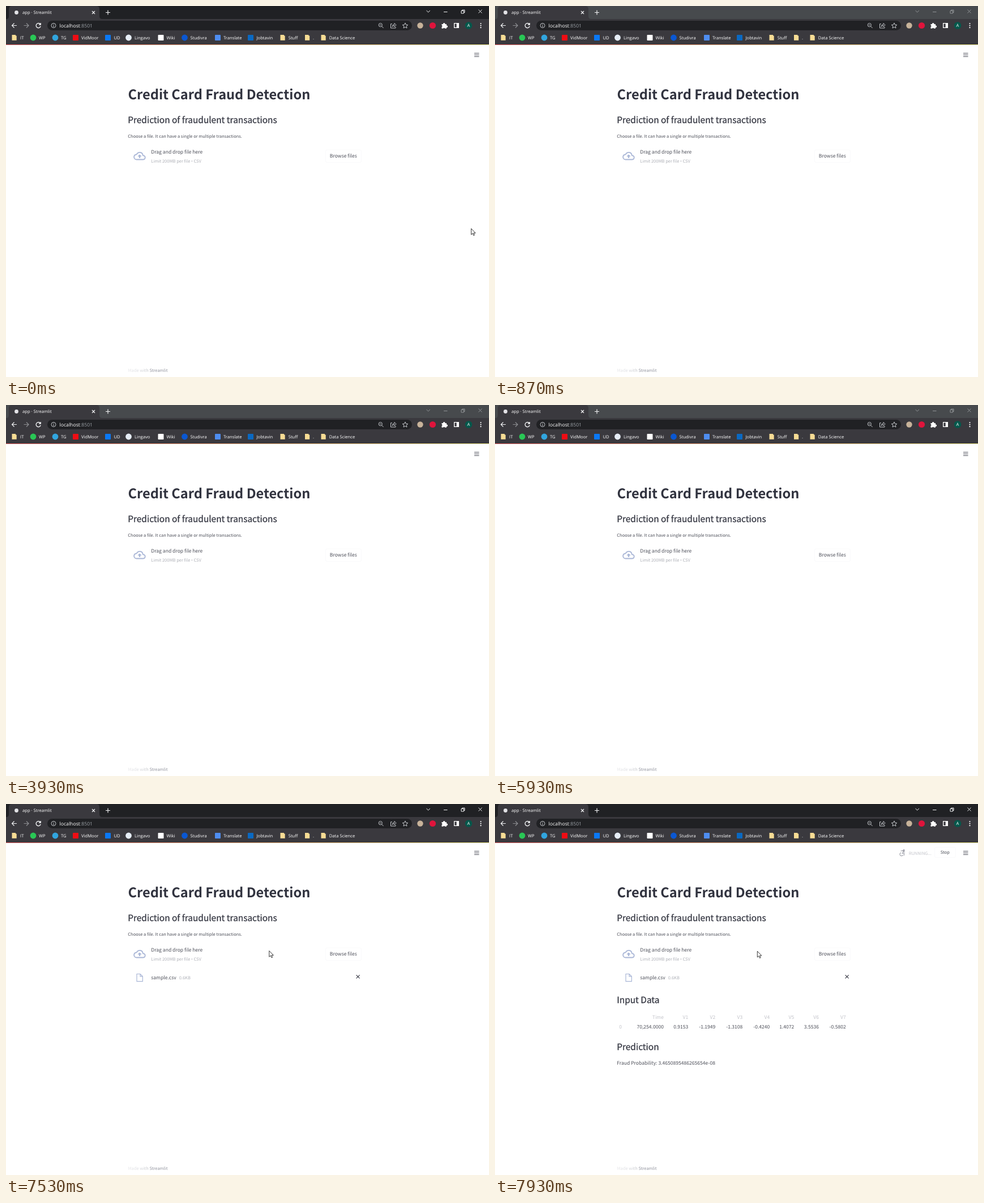
These frames come from a looping animation (853 px wide and 656 px high, 8 s). An HTML page:

```html
<!DOCTYPE html>
<html lang="en">
<head>
<meta charset="utf-8">
<title>Credit Card Fraud Detection</title>
<style>
  html, body { margin: 0; width: 100%; height: 100%; overflow: hidden; background: #fff; }
  svg { display: block; }
  text { text-rendering: geometricPrecision; white-space: pre; }
  .ui { font: 7.65px "Open Sans", "Noto Sans", sans-serif; fill: #fff; }
  .page { font: 8.57px "Noto Sans CJK JP", "Noto Sans CJK SC", "Noto Sans", sans-serif; fill: #4e505a; }
  .page .small { font-size: 7.5px; }
  .page .pale { fill: #aeb0b7; }
  .page .faint { fill: #c3c4ca; }
  .page .h1 { font-size: 23.6px; font-weight: 700; fill: #31333f; }
  .page .h3 { font-size: 15.4px; fill: #363843; stroke: #363843; stroke-width: .3px; }
  .line { fill: none; stroke: #f1f2f4; stroke-width: 1.2; }
  .button { fill: #fff; stroke: #fafafb; }
  .end { text-anchor: end; }
</style>
</head>
<body>
<svg width="853" height="656" viewBox="0 0 853 656">
  <defs>
    <linearGradient id="strip">
      <stop stop-color="#e0585a"/><stop offset="1" stop-color="#e6e27c"/>
    </linearGradient>
    <linearGradient id="fade" gradientUnits="userSpaceOnUse" x1="216" x2="254" y1="0" y2="0">
      <stop stop-color="#e8e8eb"/><stop offset=".5" stop-color="#dcdde1"/><stop offset="1" stop-color="#bfc0c6"/>
    </linearGradient>
  </defs>

  <!-- Browser window -->
  <rect id="titleBar" width="853" height="24"/>
  <path d="M1 23Q5 23 5 18V6Q5 0 10 0H160Q165 0 165 6V18Q165 23 170 23H853V68H0V23Z" fill="#3a393e"/>
  <rect x="73" y="26" width="644" height="17" rx="8.5" fill="#202124"/>
  <rect y="68" width="853" height="1" fill="url(#strip)"/>

  <g class="ui">
    <circle cx="18.5" cy="11.5" r="3.4" fill="#e2e2e6"/>
    <text x="29" y="14">app · Streamlit</text>
    <text x="94.5" y="37.7" font-size="8.7">localhost<tspan fill="#9aa0a6">:8501</tspan></text>
    <g id="bookmarks"></g>
    <circle cx="731.5" cy="34.5" r="5.2" fill="#c8b39a"/>
    <circle cx="753.5" cy="34.5" r="5.6" fill="#e0143c"/>
    <circle cx="817" cy="34.5" r="6.3" fill="#05574b"/>
    <text x="814.4" y="37.2">A</text>
    <path d="M769.5 32h2.6a1.7 1.7 0 1 1 3.3 0h2.6v2.6a1.7 1.7 0 1 1 0 3.3v1.8h-3a1.5 1.5 0 0 0-2.8 0h-2.7v-2.8a1.5 1.5 0 0 0 0-2.8Z"/>
    <path d="M791 30h9v9h-9ZM792.3 31.3v6.4h3.4v-6.4Z" fill-rule="evenodd"/>
    <circle cx="838.5" cy="31" r="1.1"/><circle cx="838.5" cy="34.6" r="1.1"/><circle cx="838.5" cy="38.2" r="1.1"/>
  </g>
  <g class="line">
    <path d="M152 9l5 5M157 9l-5 5M180 7.5v8M176 11.5h8"/>
    <path d="M19 34.5h-8.5M14.5 30.5l-4 4l4 4"/>
    <path d="M31.5 34.5h8.5M36 30.5l4 4l-4 4" stroke="#8d8e92"/>
    <path d="M60.6 32.2A4.1 4.1 0 1 0 61.2 35.8M61.2 30v3h-3" stroke-width="1.4"/>
    <g stroke="#c4c7cb" stroke-width="1">
      <circle cx="84" cy="34.5" r="4"/><path d="M84 34v3M84 32v1"/>
      <circle cx="661.3" cy="33.6" r="3.1"/><path d="M663.6 36l3 3M660 33.6h2.6"/>
      <path d="M682 31.7h-2.5v7.3h8.5v-2M682 36.5q.5-4 4-4v-2l3 3.2l-3 3v-2q-2.5-.2-4 1.8Z"/>
      <path d="M705 29.9l1.4 3.2l3.4.3l-2.6 2.3l.8 3.4l-3-1.8l-3 1.8l.8-3.4l-2.6-2.3l3.4-.3Z"/>
    </g>
    <path id="controls" stroke-width="1" d="M742.5 8l3.2 3l3.2-3M773 10.5h6.5M804 8.5h4.5v4.5h-4.5ZM805.5 8.5v-1.5h4.5v4.5h-1.5M834.5 6.5l6 6M840.5 6.5l-6 6"/>
  </g>

  <!-- App page -->
  <path d="M827 83.5h8.5M827 86.5h8.5M827 89.5h8.5" stroke="#4a4c57" stroke-width="1.1"/>
  <g class="page">
    <text class="h1" x="215.5" y="165.3">Credit Card Fraud Detection</text>
    <text class="h3" x="215.3" y="206.7">Prediction of fraudulent transactions</text>
    <text class="small" x="215.3" y="232.6">Choose a file. It can have a single or multiple transactions.</text>
    <path transform="translate(225.2 254.4) scale(.9)" fill="#a9b6d6" d="M19.35 10.04A7.49 7.49 0 0 0 12 4C9.1 4 6.6 5.64 5.35 8.04A6 6 0 0 0 0 14a6 6 0 0 0 6 6h13a5 5 0 0 0 .35-9.96ZM19 18H6a4 4 0 0 1-.44-7.97l1.07-.11l.5-.95A5.5 5.5 0 0 1 17.4 10.43l.3 1.5l1.5.1A3 3 0 0 1 19 18ZM8 13h2.55v3h2.9v-3H16l-4-4Z"/>
    <text x="256.3" y="261.4">Drag and drop file here</text>
    <text class="small pale" x="256.3" y="276.6">Limit 200MB per file <tspan font-family="Open Sans, sans-serif">•</tspan> CSV</text>
    <rect class="button" x="564.5" y="254.5" width="63" height="22" rx="2.5"/>
    <text x="571.8" y="268.2">Browse files</text>
    <text class="small" x="215.5" y="647.2" fill="url(#fade)">Made with <tspan fill="#9496a0">Streamlit</tspan></text>

    <g id="upload">
      <path d="M231 300.5h6l4.3 4.3v8.8h-10.3ZM237 300.5v4.3h4.3" fill="none" stroke="#a9b6d6" stroke-width="1.2"/>
      <text x="256.3" y="309.6">sample.csv</text>
      <text class="small pale" x="305.7" y="309.6">0.6KB</text>
      <path d="M618.6 302.4l6 6M624.6 302.4l-6 6" stroke="#31333f" stroke-width="1.1"/>
    </g>
    <g id="running">
      <g fill="none" stroke="#9b9da6" stroke-width="1.1">
        <circle cx="722" cy="82" r="1.2" fill="#9b9da6"/>
        <path d="M716.5 83.3l3-1l2 2l-2.2 3h3.4l-.6 4M721.5 84.5l2.5.5"/>
        <path d="M717.3 86a2.9 2.9 0 1 0 3 4.4"/>
      </g>
      <text class="small faint" x="730.7" y="89.6">RUNNING...</text>
      <rect class="button" x="776.5" y="76.5" width="37" height="18" rx="2.5"/>
      <text class="small" x="786.8" y="88.2">Stop</text>
    </g>
    <g id="input">
      <text class="h3" x="215.3" y="352.2">Input Data</text>
      <text class="faint" x="219.3" y="396.8">0</text>
      <g id="table"></g>
    </g>
    <g id="prediction">
      <text class="h3" x="215.3" y="434.7">Prediction</text>
      <text x="215.3" y="460.7">Fraud Probability: 3.4650895486265654e-08</text>
    </g>
  </g>

  <path id="cursor" d="M.3 .3V11l2.5-2.3l1.7 3.8l1.7-.8l-1.7-3.6h3.3Z" fill="#fff" stroke="#222" stroke-width=".9"/>
</svg>

<script>
const $ = id => document.getElementById(id);

const square = (x, color) => `<rect x="${x - 5}" y="51" width="10" height="10" rx="1" fill="${color}"/>`;
const circle = (x, color) => `<circle cx="${x}" cy="56" r="5.4" fill="${color}"/>`;
const folder = x => `<path d="M${x - 4} 51h6.5v1.5h1.7v8.3h-8.2Z" fill="#f6dc94"/>`;

const bookmarks = [
  [folder, 14.5, 25, "IT"],
  [circle, 48, 58, "WP", "#29c755"],
  [circle, 87, 97, "TG", "#31a5de"],
  [square, 123, 133, "VidMoor", "#ee0d14"],
  [square, 180, 190.5, "UD", "#0a78f5"],
  [circle, 216.5, 227, "Lingavo", "#e6edf6"],
  [square, 273.5, 283.5, "Wiki", "#ffffff"],
  [circle, 315.5, 325.5, "Studivra", "#0a57d2"],
  [square, 374, 384, "Translate", "#4e8df0"],
  [square, 432, 442.5, "Jobtavin", "#0a69c2"],
  [folder, 488.5, 498.7, "Stuff"],
  [folder, 532, 542, "."],
  [folder, 560.5, 570.8, "Data Science"]
];
$("bookmarks").innerHTML = bookmarks.map(([icon, x, textX, label, color]) =>
  icon(x, color) + `<text x="${textX}" y="58.8">${label}</text>`).join("");

const columns = [
  [298, "Time", "70,254.0000"], [341.3, "V1", "0.9153"], [389.3, "V2", "-1.1949"], [437.3, "V3", "-1.3108"],
  [485.3, "V4", "-0.4240"], [528.3, "V5", "1.4072"], [572, "V6", "3.5536"], [619.7, "V7", "-0.5802"]
];
$("table").innerHTML = columns.map(([x, name, value]) =>
  `<text class="end faint" x="${x}" y="379.6">${name}</text><text class="end" x="${x}" y="396.8">${value}</text>`).join("");

const LOOP = 8000, BLUR = 870, DRAG = 6400, DRAG_END = 7130, DROP = 7530, STEP = 66.3;

const show = (id, on) => $(id).style.display = on ? "" : "none";

function cursorAt(t) {
  if (t < 70) return [821.3, 393.3];
  if (t < DRAG) return null;
  if (t < DRAG_END) {
    const p = Math.floor((t - DRAG) / STEP) / 11;
    const rest = (1 - p) ** 2;
    return [464.5 + 352.5 * rest, 259.3 + 34.5 * rest];
  }
  return t < 7870 ? [464.5, 259.3] : [463, 260];
}

function draw(t) {
  const blurred = t >= BLUR && t < DROP;
  $("titleBar").setAttribute("fill", blurred ? "#474a4d" : "#202124");
  $("controls").setAttribute("stroke", blurred ? "#909396" : "#f1f2f4");
  show("upload", t >= DROP);
  show("running", t >= 7670);
  show("input", t >= 7800);
  show("prediction", t >= 7870);
  const at = cursorAt(t);
  show("cursor", at);
  if (at) $("cursor").setAttribute("transform", `translate(${at})`);
}

const start = performance.now();
function tick() {
  draw((performance.now() - start) % LOOP);
  requestAnimationFrame(tick);
}
tick();
</script>
</body>
</html>
```
